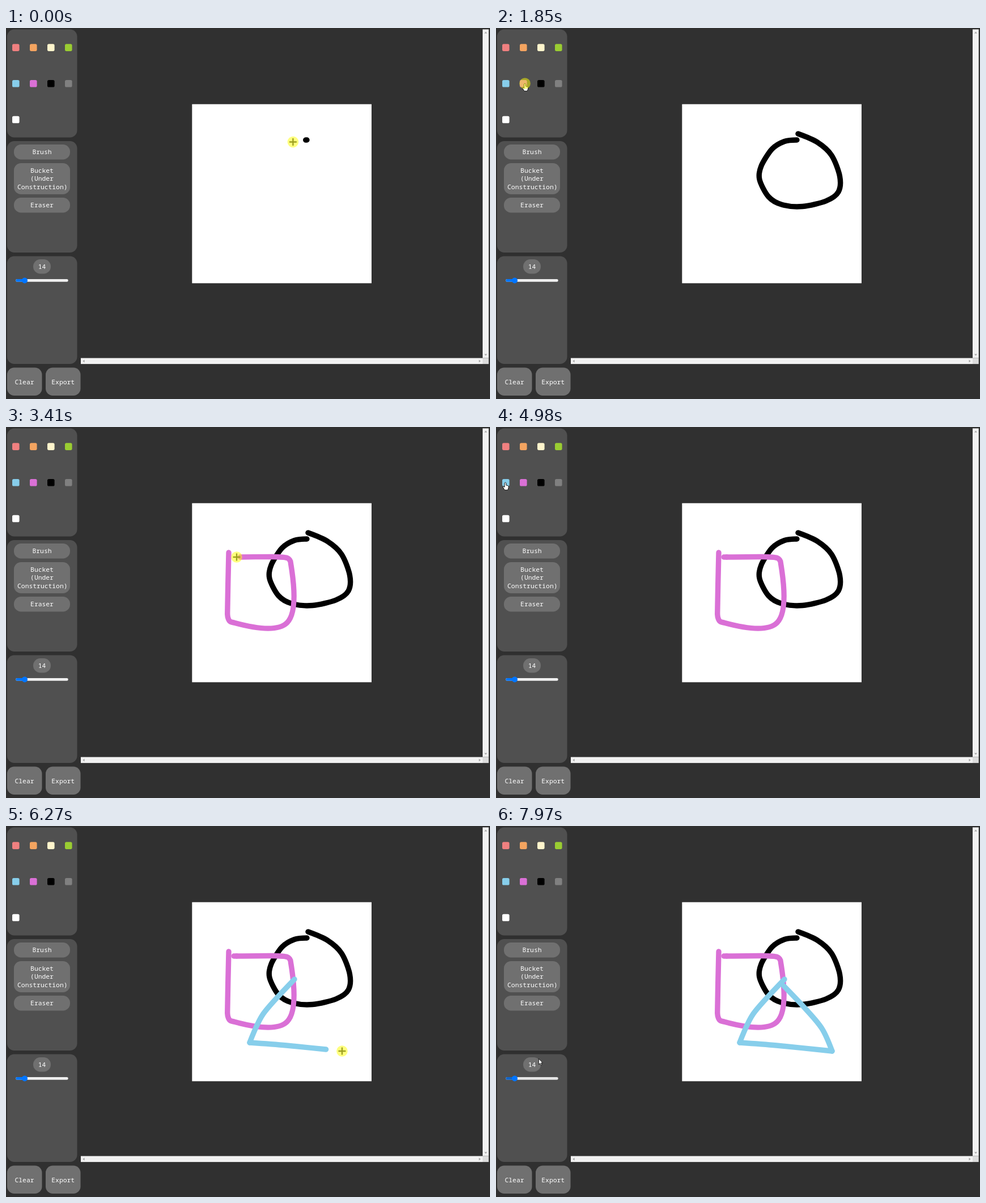
These frames come from a looping animation (854x656 px, 8000 ms). An HTML page:

```html
<!DOCTYPE html>
<html lang="en">
<head>
<meta charset="utf-8">
<title>Paint app</title>
<style>
html, body { margin: 0; width: 100%; height: 100%; overflow: hidden; background: #303030; }
svg { display: block; width: 854px; height: 656px; }
text { font: 500 11.35px "Noto Sans Mono", "DejaVu Sans Mono", monospace; fill: #fff; text-anchor: middle; }
.panel { fill: #505050; }
.btn { fill: #707070; }
.bar { fill: #f1f1f1; }
.tip { fill: #a3a3a3; }
.ink path { fill: none; stroke-width: 9.4; stroke-linecap: round; }
#rail { fill: #efefef; }
#fill, #thumb { fill: #0075ff; }
.hover #rail { fill: #e5e5e5; }
.hover #fill { fill: #1064c8; }
</style>
</head>
<body>
<svg viewBox="0 0 854 656">
  <rect width="854" height="656" fill="#303030"/>

  <rect class="panel" x="2" y="2.5" width="123.5" height="191" rx="12.5"/>
  <rect class="panel" x="2" y="200" width="123.5" height="197" rx="12.5"/>
  <rect class="panel" x="2" y="403.5" width="123.5" height="190.5" rx="12.5"/>
  <g id="swatches"></g>

  <rect class="btn" x="14" y="206" width="99" height="26.5" rx="12.5"/>
  <rect class="btn" x="14" y="239" width="99" height="55" rx="12.5"/>
  <rect class="btn" x="14" y="300" width="99" height="26.5" rx="12.5"/>
  <rect class="btn" x="48" y="409" width="31" height="25.5" rx="12.5"/>
  <rect class="btn" x="2" y="600.5" width="61.5" height="49.5" rx="12.5"/>
  <rect class="btn" x="70" y="600.5" width="61.5" height="49.5" rx="12.5"/>
  <text x="63.5" y="223">Brush</text>
  <text x="63.5" y="256">Bucket</text>
  <text x="63.5" y="270.3">(Under</text>
  <text x="64.3" y="284.5">Construction)</text>
  <text x="63.5" y="317">Eraser</text>
  <text x="63.5" y="426">14</text>
  <text x="32.5" y="629.5">Clear</text>
  <text x="100.7" y="629.5">Export</text>

  <g id="slider">
    <rect id="rail" x="17.3" y="444" width="92.4" height="4.7" rx="2.3"/>
    <rect id="fill" x="17.3" y="444" width="18" height="4.7" rx="2.3"/>
    <circle id="thumb" cx="33" cy="446.4" r="5"/>
  </g>

  <rect class="bar" x="841" y="2.4" width="10.7" height="581.2"/>
  <rect class="bar" x="132" y="583.6" width="709" height="10.5"/>
  <rect x="841" y="583.6" width="10.7" height="10.5" fill="#dcdcdc"/>
  <path class="tip" d="M844 9.5l2.5-3 2.5 3zM844 576.5l2.5 3 2.5-3zM138.5 586.5l-3 2.5 3 2.5zM834.5 586.5l3 2.5-3 2.5z"/>

  <rect x="328.3" y="134.7" width="316.7" height="316.6" fill="#fff"/>
  <g class="ink" id="ink"></g>

  <g id="pointer">
    <path id="cross" d="M-6.5 0H6.5M0-6.5V6.5" stroke="#3c4040" stroke-width="2.4"/>
    <path id="arrow" d="M.4.4V10.4L2.8 8.3 4.3 11.6 5.9 10.9 4.5 7.7H7.5Z" fill="#fff" stroke="#000" stroke-width=".8"/>
    <path id="hand" d="M-1.4 1Q0-1 1.4 1V5L4.4 5.6Q5.6 6 5.6 7.4V9.6L4.2 13.4H-1.2L-4.2 8.6Q-4.4 6.9-2.8 7.2L-1.4 8.4Z" fill="#fff" stroke="#000" stroke-width=".9"/>
    <circle id="press" r="9.8" fill="#ff0" fill-opacity=".5"/>
  </g>
</svg>
<script>
const LOOP = 8000, LAG = 68, SIZE = 12.6;
const BLACK = '#000', ORCHID = '#da70d6', SKY = '#87ceeb';
const $ = id => document.getElementById(id);
const make = (tag, attrs, parent) => {
  const el = document.createElementNS('http://www.w3.org/2000/svg', tag);
  for (const k in attrs) el.setAttribute(k, attrs[k]);
  if (parent) parent.append(el);
  return el;
};

const swatches = ['#f08080', '#f4a460', '#fff5cc', '#9acd32', SKY, ORCHID, BLACK, '#808080', '#fff'].map((fill, i) => {
  const x = 11 + i % 4 * 31, y = 28.3 + Math.floor(i / 4) * 63.7;
  make('rect', { x, y, width: SIZE, height: SIZE, rx: 2.6, fill }, $('swatches'));
  return { x, y };
});

// Smooth curve through a few points.
function curve(text) {
  const p = text.split(' ').map(s => s.split(',').map(Number));
  const dist = (a, b) => Math.hypot(b[0] - a[0], b[1] - a[1]);
  const tangent = p.map((q, i) => {
    const a = p[i - 1], b = p[i + 1];
    if (!a || !b) return [0, 0];
    const k = Math.min(dist(a, q), dist(q, b)) / 3 / dist(a, b);
    return [(b[0] - a[0]) * k, (b[1] - a[1]) * k];
  });
  let d = 'M' + p[0];
  for (let i = 1; i < p.length; i++) {
    const [a, b, u, v] = [p[i - 1], p[i], tangent[i - 1], tangent[i]];
    d += `C${a[0] + u[0]},${a[1] + u[1]} ${b[0] - v[0]},${b[1] - v[1]} ${b}`;
  }
  return d;
}

const smooth = s => s * s * (3 - 2 * s);
const slowing = s => s * (2 - s);

const legs = [];
function move(from, to, ease, route, color) {
  const path = make('path', { d: curve(route) }, color && $('ink'));
  if (color) path.setAttribute('stroke', color);
  const len = path.getTotalLength();
  const reach = t => len * ease(Math.min(1, Math.max(0, (t - from) / (to - from))));
  legs.push({ from, to, path, color, len, reach });
}

// Round shape
move(-95, 550, smooth, '531,198 509,200.5 487,214 468,244 465,268 481,298.5 505,312.5 541,315.5 582,306 604,290 606.5,262 592,225 567,202 533,187', BLACK);
move(660, 1800, slowing, '533,187 290,316 39,101 51,98');
// Box
move(1960, 2480, smooth, '51,98 426,248 393,222');
move(2490, 3410, smooth, '393,222 390.7,331 398,345 496,346 502.3,240 496,231.5 470,229.5 407,230', ORCHID);
move(3710, 3730, smooth, '407,230 402,230', ORCHID);
move(3740, 4850, smooth, '402,230 88,112 16.5,98');
// Triangle
move(5250, 5750, smooth, '16.5,98 531,262 509,271');
move(5760, 6060, smooth, '509,271 454,332 430,383', SKY);
move(6110, 6270, slowing, '430,383 495,388 593,398', SKY);
move(6340, 6950, smooth, '593,398 575,358 545,322 508,283', SKY);
move(7010, LOOP, smooth, '508,283 143,488 74.5,410');

const show = (el, on) => { el.style.visibility = on ? 'visible' : 'hidden'; };

function render(t) {
  const i = legs.findLastIndex(l => t >= l.from);
  const leg = legs[i], next = legs[i + 1];

  for (const l of legs.filter(l => l.color)) {
    l.path.setAttribute('stroke-dasharray', `${l.reach(t - LAG) + .01} ${l.len + 20}`);
    show(l.path, t >= l.from + 20);
  }

  const { x, y } = leg.path.getPointAtLength(leg.reach(t));
  const onPage = x > 328 && x < 645 && y > 135 && y < 451;
  const onSwatch = swatches.some(s => x >= s.x && x <= s.x + SIZE && y >= s.y && y <= s.y + SIZE);
  const drawing = leg.color && t > leg.from + 20 && (next.color || t < leg.to + 40);
  const clicking = onSwatch && next && t > next.from - 130;

  $('pointer').setAttribute('transform', `translate(${x} ${y})`);
  show($('cross'), onPage);
  show($('hand'), onSwatch);
  show($('arrow'), !onPage && !onSwatch);
  show($('press'), drawing || clicking);
  $('slider').classList.toggle('hover', x < 110 && y > 400 && y < 455);
}

const start = performance.now();
function tick() {
  render((performance.now() - start) % LOOP);
  requestAnimationFrame(tick);
}
tick();
</script>
</body>
</html>
```
